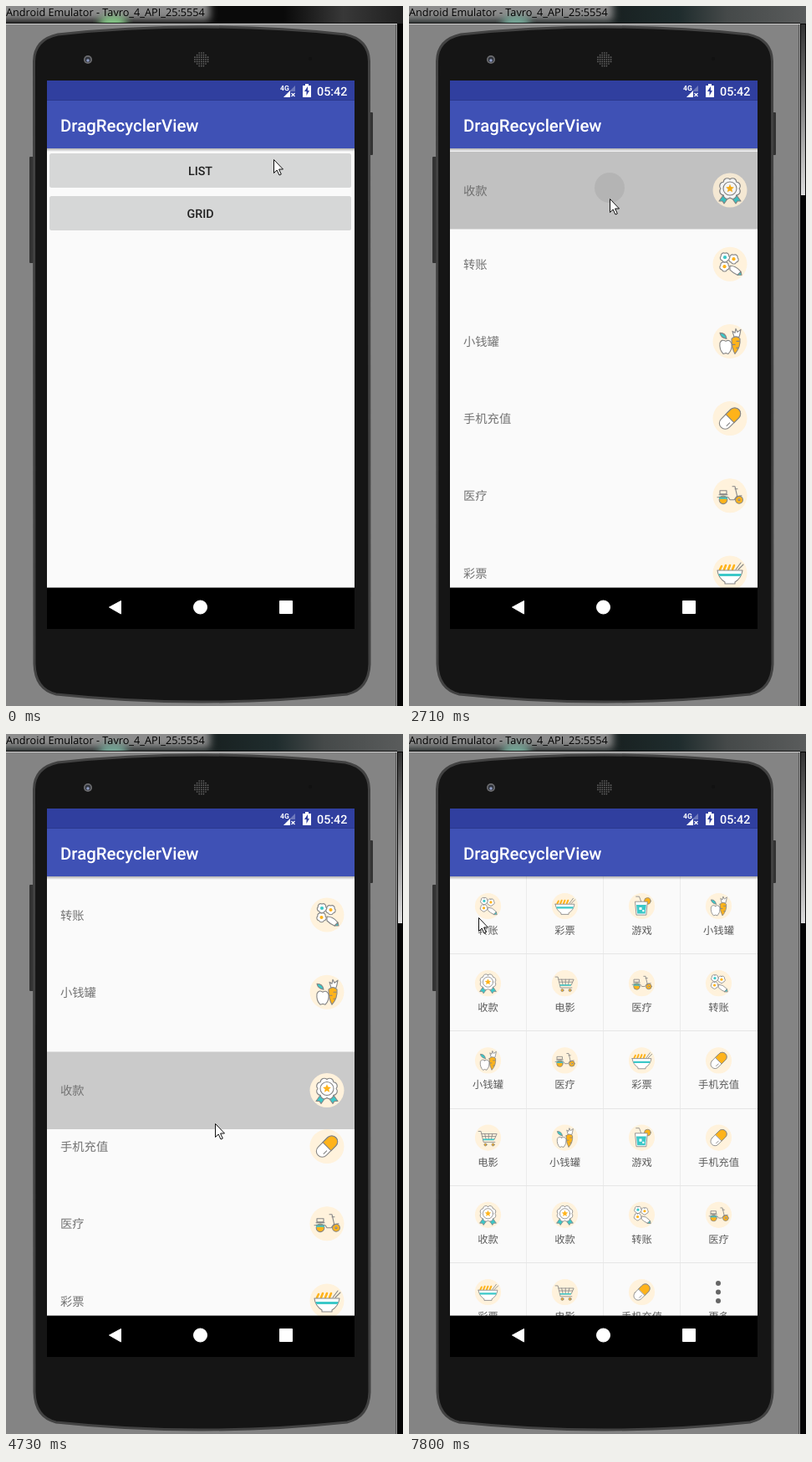
An HTML page for the animation above (8 s loop, 475x836 px).

```html
<!DOCTYPE html>
<html lang="zh">
<head>
<meta charset="utf-8">
<style>
html, body { margin: 0; width: 100%; height: 100%; overflow: hidden; background: #848484; }
svg { display: block; width: 475px; height: 836px; }
text { font-family: Roboto, "Noto Sans CJK SC", "Noto Sans CJK", sans-serif; text-rendering: geometricPrecision; }
.medium { font-weight: 500; }
.label { font-size: 14.3px; fill: #737373; }
.small { font-size: 12.3px; fill: #5c5c5c; text-anchor: middle; }
.button { font-size: 14.3px; font-weight: 500; fill: #212121; text-anchor: middle; }
.icon { fill: #fff; stroke: #858585; stroke-width: 1.1; stroke-linejoin: round; stroke-linecap: round; }
.icon .plate { fill: #fff2dc; stroke: none; }
.icon .o { fill: #ffb31a; }
.icon .t { fill: #3cc8c8; }
.icon .flat { stroke: none; }
.icon .line { fill: none; }
.icon .strand { fill: none; stroke: #ffb31a; stroke-width: 2.6; }
</style>
</head>
<body>
<svg id="stage" viewBox="0 0 475 836"></svg>
<script>
const LOOP = 8000, STEP = 135.5, ROW = 92.2, TOP = 170;

// Closed ring of n outward bumps
function scallop(n, r, cx, cy) {
  const point = i => {
    const a = i * 2 * Math.PI / n - Math.PI / 2;
    return `${(cx + r * Math.cos(a)).toFixed(2)} ${(cy + r * Math.sin(a)).toFixed(2)}`;
  };
  const k = (r * Math.sin(Math.PI / n) * 1.1).toFixed(2);
  let d = 'M' + point(0);
  for (let i = 1; i <= n; i++) d += `A${k} ${k} 0 0 1 ${point(i)}`;
  return d + 'Z';
}
const path = (d, cls = '') => `<path class="${cls}" d="${d}"/>`;
const dot = (x, y, r, cls = '') => `<circle class="${cls}" cx="${x}" cy="${y}" r="${r}"/>`;
const rect = (x, y, w, h, fill, more = '') =>
  `<rect x="${x}" y="${y}" width="${w}" height="${h}" fill="${fill}" ${more}/>`;
const text = (x, y, s, cls, more = '') => `<text x="${x}" y="${y}" class="${cls}" ${more}>${s}</text>`;
const flower = (x, y, cls) => path(scallop(5, 4.9, x, y)) + dot(x, y, 2.1, cls + ' flat');

const star = 'M' + Array.from({length: 10}, (_, i) => {
  const r = i % 2 ? 2.4 : 5.2, a = i * Math.PI / 5 - Math.PI / 2;
  return `${(r * Math.cos(a)).toFixed(1)} ${(r * Math.sin(a) - 2).toFixed(1)}`;
}).join('L') + 'Z';

const icons = {
  badge: path('M-8 6L-13 13L-9 13L-7 16L-2 9Z', 't') + path('M8 6L13 13L9 13L7 16L2 9Z', 't') +
    path(scallop(8, 11, 0, -2)) + dot(0, -2, 8) + path(star, 'o flat'),
  flowers: path('M0 2Q7 2 12 8Q14 10 12 12L9 13Q4 11 0 7Z') + path('M9 13L13 9L14 13Z', 't') +
    flower(-6, -8, 't') + flower(4.5, -6, 'o') + flower(-6.5, 3, 'o'),
  veg: path('M5 -5L3 -12L6 -10L7 -15L9 -11L13 -14Q12 -8 11 -5Z') +
    path('M2 -3Q7 -8 12 -3Q13 7 6 15Q2 8 2 -3Z', 'o') + path('M8 0H11M3 4H6M8 8H10', 'line') +
    path('M-5 0Q-10 -3 -12 2Q-13 10 -8 15L-5 14L-2 15Q3 10 2 3Q0 -3 -5 0Z') +
    path('M-4 -3Q-5 -10 -12 -10Q-11 -4 -4 -3Z', 't'),
  pill: '<g transform="rotate(-45)"><rect x="-15" y="-7" width="30" height="14" rx="7"/>' +
    path('M0 -7H8A7 7 0 0 1 8 7H0Z', 'o') + path('M-9 3.5H-4', 'line') + '</g>',
  scooter: dot(-8, 5, 4.8, 'o') + dot(11, 5, 4.4, 'o') + dot(11, 5, 1) +
    path('M-13 1H-3V4H-13Z', 't flat') +
    path('M-12 -6H-4V-2H-12ZM-13 -1H-3M3 -11H6L9 2M6 -8H9M-15 2H-2L0 5H5L8 1L14 0', 'line'),
  noodles: path('M-12 -4L-10 -8M-7 -4L-5 -9M-2 -4L0 -9M3 -4L5 -9', 'strand') +
    path('M7 -4L13 -12M10 -4L16 -10', 'line') +
    path('M-15 -3H15Q14 6 6 11V13H-6V11Q-14 6 -15 -3Z') + path('M-13.5 1H13.5L12.5 4H-12.5Z', 't flat'),
  drink: dot(9, -8, 5, 'o') + path('M-1 -7L-4 -15H-9', 'line') + path('M-10 -7H9L7 14H-8Z') +
    path('M-8.5 -2H7L5.5 12H-7Z', 't flat') + path('M-4 2H0V6H-4ZM1 6H4V9H1Z', 'flat'),
  cart: path('M-15 -10H-11L-7 7H11M-10 -6H14L10 3H-8M-5 -6L-3 3M1 -6V3M7 -6L5 3M-9 -2H12', 'line') +
    path('M-8 2H10L9.5 4H-7.5Z', 't flat') + dot(-4, 11, 2, 'o') + dot(8, 11, 2, 'o')
};
const names = {
  badge: '收款', flowers: '转账', veg: '小钱罐', pill: '手机充值',
  scooter: '医疗', noodles: '彩票', drink: '游戏', cart: '电影'
};
const icon = (key, x, y, scale = 1) =>
  `<g class="icon" transform="translate(${x} ${y}) scale(${scale})">${dot(0, 0, 20.5, 'plate')}${icons[key]}</g>`;

const order = ['badge', 'flowers', 'veg', 'pill', 'scooter', 'noodles'];
const listRow = key => `<g id="${key}">` +
  (key === 'badge' ? rect(49, 0, 368, 92.5, '#cacaca', 'id="held"') : '') +
  text(65, 51.5, names[key], 'label') + icon(key, 384, 46) + '</g>';

const cells = `flowers noodles drink veg badge cart scooter flowers veg scooter noodles pill
  cart veg drink pill badge badge flowers scooter noodles cart pill more`.split(/\s+/);
const gridCell = (key, i) => {
  const x = 94.5 + i % 4 * 92, y = 205.5 + Math.floor(i / 4) * ROW;
  const picture = key === 'more'
    ? `<g fill="#666">${[-10.5, 0, 10.5].map(d => dot(x - .5, y + d, 3)).join('')}</g>`
    : icon(key, x, y, .76);
  return picture + text(x, y + 33.5, names[key] || '更多', 'small');
};
const gridLines = [1, 2, 3].map(i => rect(48 + i * 92, TOP, 1, 525, '#ebebeb')).join('') +
  [1, 2, 3, 4, 5].map(i => rect(49, Math.round(TOP + i * ROW), 368, 1, '#e6e6e6')).join('');

let holes = '';
for (let y = -8; y <= 8; y += 2.6)
  for (let x = -8; x <= 8; x += 2.6)
    if (Math.hypot(x, y) < 9) holes += dot((234 + x).toFixed(1), (64 + y).toFixed(1), .85);

const stage = document.getElementById('stage');
stage.innerHTML = `
<defs>
  <linearGradient id="bar0"><stop offset=".5" stop-color="#0a0a0a"/><stop offset=".7" stop-color="#0a0a0a"/>
    <stop offset=".85" stop-color="#383838"/><stop offset="1" stop-color="#202020"/></linearGradient>
  <linearGradient id="bar1"><stop offset=".5" stop-color="#182020"/><stop offset=".68" stop-color="#1f2c2d"/>
    <stop offset=".8" stop-color="#454949"/><stop offset="1" stop-color="#5a5c5c"/></linearGradient>
  <linearGradient id="edge" x2="0" y2="1"><stop stop-color="#333"/><stop offset="1" stop-color="#ddd"/></linearGradient>
  <linearGradient id="shade" x2="0" y2="1"><stop stop-color="#000" stop-opacity=".3"/>
    <stop offset="1" stop-color="#000" stop-opacity="0"/></linearGradient>
  <filter id="blur" x="-20%" y="-100%" width="140%" height="300%"><feGaussianBlur stdDeviation="5"/></filter>
  <clipPath id="content"><rect x="49" y="170" width="368" height="525"/></clipPath>
  <clipPath id="title"><rect width="475" height="21"/></clipPath>
</defs>
${rect(0, 0, 475, 836, '#848484')}
<g clip-path="url(#title)">
  ${rect(0, 0, 475, 21, 'url(#bar0)', 'id="bar"')}
  ${rect(-20, -20, 264, 37, '#8c8c8c', 'filter="url(#blur)"')}
  <ellipse id="glow" cx="128" cy="20" rx="17" ry="9" filter="url(#blur)"/>
  <text x="0" y="12" style="font:12.7px 'Open Sans','Noto Sans',sans-serif">Android Emulator - Tavro_4_API_25:5554</text>
</g>
${rect(0, 20, 468, 1, '#111')}${rect(0, 21, 468, 1, '#d0d0d0')}
${rect(466, 22, 1, 814, '#555')}${rect(467, 22, 1, 814, '#999')}${rect(468, 21, 7, 815, '#050505')}
${rect(469, 22, 5, 204, 'url(#edge)', 'id="streak"')}
${rect(28, 180, 5, 127, '#333', 'rx="1"')}${rect(434, 127, 5, 51, '#333', 'rx="1"')}
<path d="M33.5 66Q34 40 62 34Q145 25 234 25Q323 25 406 34Q434 40 434.5 66L435 786Q434 816 408 822Q323 831 234 831Q145 831 60 822Q35 816 34 786Z"
  fill="#151515" stroke="#424242" stroke-width="3"/>
<circle cx="98" cy="64" r="5" fill="#6d6d70"/><circle cx="98" cy="64" r="3.3" fill="#30343c"/><circle cx="98" cy="65" r="1.8" fill="#8f9cc4"/>
<g fill="#676767">${holes}</g>
<circle cx="364" cy="63" r="2" fill="#111"/>
${rect(49, 89, 368, 24, '#303f9f')}${rect(49, 113, 368, 57, '#3f51b5')}${rect(49, 112, 368, 1, '#2b398e')}
${text(328, 101, '4G', '', 'font-size="8.5" font-weight="700" fill="#fff"')}
<path d="M346 95V109H332Z" fill="#6f7abc"/><path d="M340 101V109H332Z" fill="#fff"/>
${rect(340, 102, 7, 8, '#303f9f')}<path d="M341.5 104L345.5 108M345.5 104L341.5 108" stroke="#fff" stroke-width="1.2"/>
<path d="M355 95H358V93H362V95H365V109H355Z" fill="#fff"/><path d="M361 96L357 102H359.5V107L363 101H361Z" fill="#303f9f"/>
${text(372, 106.5, '05:42', 'medium', 'font-size="14.3" fill="#fff"')}
${text(65, 149.5, 'DragRecyclerView', 'medium', 'font-size="20.4" fill="#fff"')}
${rect(49, 170, 368, 525, '#fafafa')}
<g clip-path="url(#content)">
  <g id="home">
    ${rect(52, 176, 361, 41, '#d6d7d7', 'rx="2.5"')}${text(232.5, 201.5, 'LIST', 'button')}
    ${rect(52, 227, 361, 41, '#d6d7d7', 'rx="2.5"')}${text(232.5, 252.5, 'GRID', 'button')}
  </g>
  <g id="list">
    ${order.slice(1).map(listRow).join('')}${listRow('badge')}
    <g id="ripple">${rect(49, 0, 368, 92.5, '#000', 'opacity=".045"')}<circle id="spot" cx="240" cy="43" opacity=".065"/></g>
  </g>
  <g id="grid">${gridLines}${cells.map(gridCell).join('')}</g>
  ${rect(49, 170, 368, 4, 'url(#shade)')}
</g>
${rect(49, 694.6, 368, 49.4, '#000')}
<g fill="#fff" stroke="#fff" stroke-linejoin="round"><path d="M123.5 718L137.5 710.5V726Z"/><circle cx="232.5" cy="718" r="8"/>
  <rect x="327.5" y="710.5" width="15" height="15"/></g>
<path id="cursor" d="M.5 .5V16.5L4.2 13L7 19L9.3 18L6.6 12H11.5Z" fill="#fff" stroke="#111"/>`;

const el = id => document.getElementById(id);
const show = (id, on) => { el(id).style.display = on ? '' : 'none'; };
const move = (id, x, y) => el(id).setAttribute('transform', `translate(${x} ${y})`);

// Keys are [step, value, ...]; linear between them
function at(keys, n) {
  const i = keys.findIndex(k => k[0] > n);
  if (i < 0) return keys[keys.length - 1].slice(1);
  const a = keys[i - 1], b = keys[i], p = (n - a[0]) / (b[0] - a[0]);
  return a.slice(1).map((v, j) => v + (b[j + 1] - v) * p);
}
const pointer = [[0, 320, 183], [1, 308, 190], [2, 301, 193], [5, 301, 193], [8, 285, 214], [9, 285, 214],
  [11, 241, 217], [19, 241, 217], [20, 240, 230], [28, 237, 400], [33, 250, 465], [38, 250, 465],
  [42, 131, 725], [44, 131, 725], [46, 128, 502], [47, 128, 502], [51, 238, 245], [54, 238, 245], [57, 83, 219]];
const drag = [[0, 0], [19, 0], [20, 4], [27, 161], [28, 175], [33, 242], [34, 242], [35, 209.5], [36, 184.4]];
const rise = (from, n) => at([[0, 0], [from, 0], [from + 2, ROW], [99, ROW]], n)[0];

function draw() {
  const n = Math.floor((performance.now() % LOOP + 25) / STEP);
  const first = n < 1, inList = n >= 5 && n < 45, inGrid = n >= 53;
  el('bar').setAttribute('fill', first ? 'url(#bar0)' : 'url(#bar1)');
  el('glow').setAttribute('fill', first ? '#86c988' : '#76a898');
  show('streak', !first);
  show('home', !inList && !inGrid);
  show('list', inList);
  show('grid', inGrid);

  const offset = at(drag, n)[0];
  order.forEach((key, i) => move(key, 0, TOP + i * ROW));
  move('badge', 0, TOP + offset);
  move('flowers', 0, TOP + ROW - rise(23, n));
  move('veg', 0, TOP + 2 * ROW - rise(28, n));
  show('held', n >= 20 && n < 36);
  show('ripple', n >= 16 && n < 22);
  move('ripple', 0, TOP + offset);
  el('spot').setAttribute('r', n < 17 ? 10 : 18);

  move('cursor', ...at(pointer, n).map(Math.round));
  requestAnimationFrame(draw);
}
draw();
</script>
</body>
</html>
```
